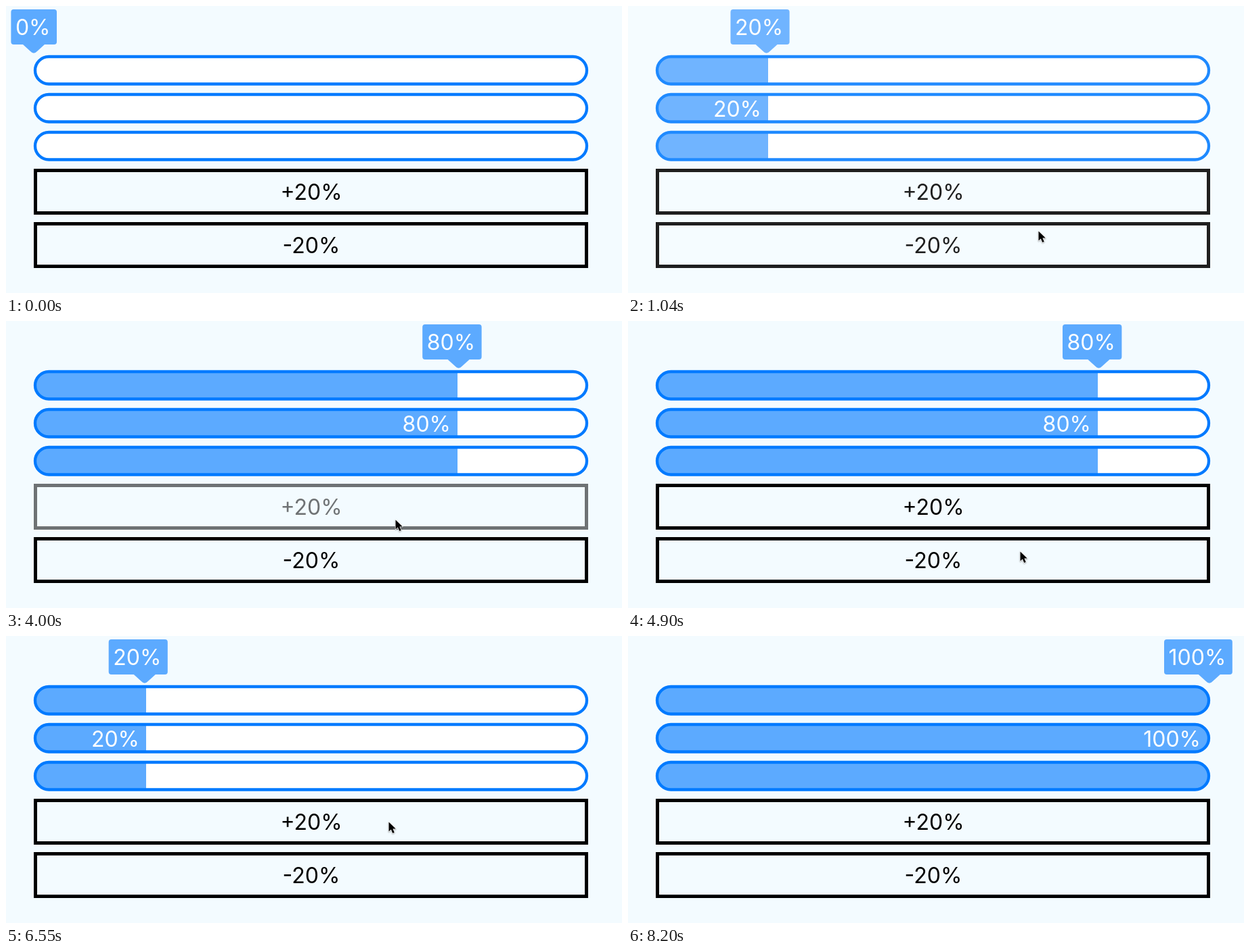
An HTML page with a canvas that plays this animation: 910 by 425 pixels, repeating every 8.84 s.

```html
<!DOCTYPE html>
<html lang="en">
<head>
<meta charset="utf-8">
<title>Progress bars</title>
<style>
  html, body { margin: 0; width: 100%; height: 100%; overflow: hidden; background: #f3fbff; }
  canvas { display: block; width: 910px; height: 425px; }
</style>
</head>
<body>
<canvas id="stage" width="910" height="425"></canvas>
<script>
const ctx = document.getElementById('stage').getContext('2d');
const LOOP = 8840;
const BLUE = '#007aff', LIGHT = '#5caaff', PAGE = '#f3fbff';
const FONT = '400 32px Inter, sans-serif';
const BARS = [73, 129, 185];

// Taps on the buttons: time and direction
const TAPS = [
  [1700, 1], [2870, 1], [3851, 1],
  [5457, -1], [5740, -1], [6010, -1],
  [6640, 1], [6960, 1], [7290, 1], [7600, 1]
];

// Pointer path: time, x, y
const PATH = [
  [590, 612, 393], [1034, 606, 333], [1478, 575, 294], [4150, 575, 294],
  [4900, 579, 341], [5050, 581, 347], [6100, 581, 347], [6250, 566, 277],
  [6550, 565, 275], [7750, 565, 275], [8200, 560, 430]
];

const clamp = (v, a, b) => Math.min(b, Math.max(a, v));

// The screen refreshes in steps of about 150 ms
function snap(t) {
  if (t < 300) return 0;
  if (t < 590) return 300;
  if (t < 2950) return 590 + Math.floor((t - 590) / 148) * 148;
  return Math.min(8200, 2950 + Math.floor((t - 2950) / 150) * 150);
}

// Lightly underdamped step response
function spring(ms) {
  if (ms <= 0) return 0;
  const s = ms / 1000;
  return 1 - Math.exp(-11.8 * s) * (Math.cos(11.2 * s) + 1.053 * Math.sin(11.2 * s));
}

function tapAlpha(ms) {
  if (ms < 0 || ms > 234) return 1;
  if (ms < 75) return 1 - 0.8 * ms / 75;
  const x = (ms - 75) / 159;
  return 0.2 + 0.8 * (x < 0.5 ? 2 * x * x : 1 - 2 * (1 - x) * (1 - x));
}

function stateAt(t) {
  const state = { level: t < 300 ? 0 : 0.2, target: t < 300 ? 0 : 20, plus: 1, minus: 1 };
  for (const [start, dir] of TAPS) {
    if (t < start) continue;
    state.level += 0.2 * dir * spring(t - start);
    state.target += 20 * dir;
    const key = dir > 0 ? 'plus' : 'minus';
    state[key] = Math.min(state[key], tapAlpha(t - start));
  }
  return state;
}

function pointerAt(t) {
  if (t < PATH[0][0]) return null;
  for (let i = 1; i < PATH.length; i++) {
    const [t0, x0, y0] = PATH[i - 1], [t1, x1, y1] = PATH[i];
    if (t < t1) {
      const k = (t - t0) / (t1 - t0);
      const e = k * k * (3 - 2 * k);
      return [x0 + (x1 - x0) * e, y0 + (y1 - y0) * e];
    }
  }
  return null;
}

function text(str, x, y, align, color) {
  ctx.textAlign = align;
  ctx.fillStyle = color;
  ctx.fillText(str, x, y);
}

function rounded(x, y, w, h, r) {
  ctx.beginPath();
  ctx.roundRect(x, y, w, h, r);
}

function drawBar(y, level, label) {
  const edge = Math.round(45 + 811 * clamp(level, 0, 1));
  rounded(43, y + 2, 815, 40.5, 20.25);
  ctx.fillStyle = '#fff';
  ctx.fill();
  ctx.save();
  ctx.clip();
  ctx.beginPath();
  ctx.rect(43, y, edge - 43, 45);
  ctx.clip();
  if (level > 0) {
    ctx.fillStyle = LIGHT;
    ctx.fillRect(43, y, edge - 43, 45);
    if (label) text(label, edge - 10, y + 90.5 - 56 + 0.5, 'right', '#fff');
  }
  ctx.restore();
  rounded(43, y + 2, 815, 40.5, 20.25);
  ctx.strokeStyle = BLUE;
  ctx.lineWidth = 4.3;
  ctx.stroke();
}

function drawTip(level, label) {
  const tip = 41 + 818 * level;
  const right = tip + 34;
  const width = ctx.measureText(label).width + 16;
  ctx.fillStyle = LIGHT;
  rounded(right - width, 5, width, 52, 4);
  ctx.fill();
  ctx.beginPath();
  ctx.moveTo(tip - 18, 56);
  ctx.lineTo(tip - 16, 57);
  ctx.lineTo(tip - 5, 67);
  ctx.quadraticCurveTo(tip, 72.5, tip + 5, 67);
  ctx.lineTo(tip + 16, 57);
  ctx.lineTo(tip + 18, 56);
  ctx.fill();
  text(label, right - 9.5, 42.5, 'right', '#fff');
}

function drawButton(y, label, alpha) {
  ctx.globalAlpha = alpha;
  ctx.strokeStyle = '#000';
  ctx.lineWidth = 5;
  ctx.strokeRect(43.5, y + 2.5, 814, 63);
  text(label, 451, y + 45.5, 'center', '#000');
  ctx.globalAlpha = 1;
}

function drawPointer([x, y]) {
  ctx.save();
  ctx.translate(x, y);
  ctx.beginPath();
  ctx.moveTo(0.5, 0.5);
  ctx.lineTo(0.5, 14.5);
  ctx.lineTo(3.8, 11.5);
  ctx.lineTo(6.2, 17);
  ctx.lineTo(8.8, 15.9);
  ctx.lineTo(6.4, 10.6);
  ctx.lineTo(10.8, 10.6);
  ctx.closePath();
  ctx.shadowColor = 'rgba(0,0,0,.35)';
  ctx.shadowBlur = 2;
  ctx.shadowOffsetY = 1;
  ctx.lineWidth = 1.5;
  ctx.lineJoin = 'round';
  ctx.strokeStyle = '#fff';
  ctx.stroke();
  ctx.shadowColor = 'transparent';
  ctx.fillStyle = '#000';
  ctx.fill();
  ctx.restore();
}

function draw(t) {
  const { level, target, plus, minus } = stateAt(t);
  const label = target + '%';
  ctx.font = FONT;
  ctx.fillStyle = PAGE;
  ctx.fillRect(0, 0, 910, 425);
  BARS.forEach((y, i) => drawBar(y, level, i === 1 ? label : ''));
  drawTip(level, label);
  drawButton(241, '+20%', plus);
  drawButton(320, '-20%', minus);
  // Paler screen shortly after the start
  if (t >= 300 && t < 1330) {
    ctx.fillStyle = 'rgba(255,255,255,.12)';
    ctx.fillRect(0, 0, 910, 425);
  }
  const pointer = pointerAt(t);
  if (pointer) drawPointer(pointer);
}

const start = performance.now();
function tick() {
  draw(snap((performance.now() - start) % LOOP));
  requestAnimationFrame(tick);
}
tick();
</script>
</body>
</html>
```
